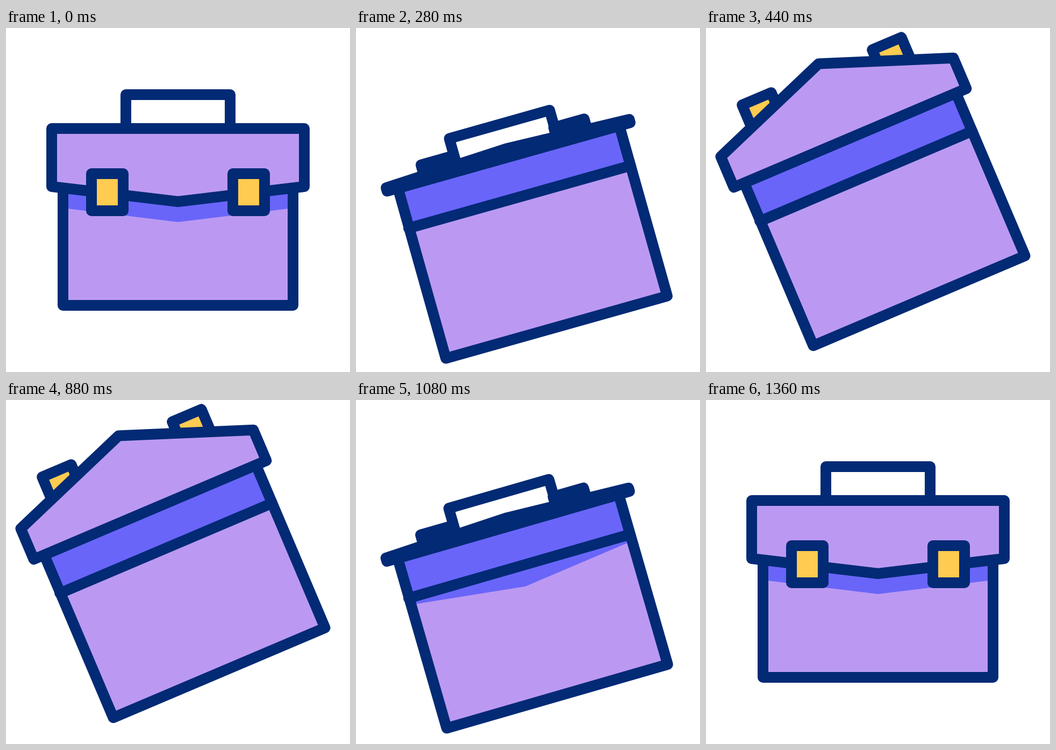
An HTML page with a canvas for the animation above (1480 ms loop, 640 px wide and 640 px high).

```html
<!DOCTYPE html>
<html lang="en">
<head>
<meta charset="utf-8">
<title>Briefcase</title>
<style>
html, body { margin: 0; width: 100%; height: 100%; overflow: hidden; background: #fff; }
canvas { display: block; width: 640px; height: 640px; }
</style>
</head>
<body>
<canvas id="stage" width="640" height="640"></canvas>
<script>
const ctx = document.getElementById('stage').getContext('2d');
const NAVY = '#032a75', LILAC = '#bb99f2', VIOLET = '#6965f9', GOLD = '#ffcb50';
const LOOP = 1480, STEP = 40;
const HINGE = 187, RIM = 264, BASE = 516;

const lerp = (a, b, k) => a + (b - a) * k;

function ease(t, from, to) {
  const p = Math.min(1, Math.max(0, (t - from) / (to - from)));
  return p * p * (3 - 2 * p);
}

// Value through [time, value] keys, eased between neighbours.
function track(t, keys) {
  let v = keys[0][1];
  for (let i = 1; i < keys.length; i++) {
    if (t > keys[i - 1][0]) v = lerp(keys[i - 1][1], keys[i][1], ease(t, keys[i - 1][0], keys[i][0]));
  }
  return v;
}

function shape(points, fill, line = true, closed = true) {
  ctx.beginPath();
  points.forEach(([x, y]) => ctx.lineTo(x, y));
  if (closed) ctx.closePath();
  if (fill) {
    ctx.fillStyle = fill;
    ctx.fill();
  }
  if (line) ctx.stroke();
}

const box = (x1, y1, x2, y2) => [[x1, y1], [x2, y1], [x2, y2], [x1, y2]];

// Flap hanging from the hinge; negative depths stand up.
function flap(side, tip) {
  shape([[85, HINGE], [555, HINGE], [555, HINGE + side], [320, HINGE + tip], [85, HINGE + side]], LILAC);
}

function clasps(near, far, shift = 0) {
  for (const x of [159, 422 + shift]) shape(box(x, HINGE + near, x + 59, HINGE + far), GOLD);
}

function body(shade) {
  const case_ = box(106, HINGE, 534, BASE);
  shape(case_, VIOLET, false);
  ctx.save();
  ctx.beginPath();
  ctx.rect(106, RIM, 428, BASE - RIM);
  ctx.clip();
  shape([[106, 335 + shade], [320, 361 + shade], [534, 335 + shade], [534, BASE], [106, BASE]], LILAC, false);
  ctx.restore();
  shape([[105, RIM], [534, RIM]], null, true, false);
  shape(case_);
}

function draw(t) {
  const angle = track(t, [[80, 0], [400, 23], [920, 23], [1360, 0]]);
  const drop = track(t, [[80, 0], [240, 55.5], [400, 7], [920, 7], [1160, 55.5], [1360, 0]]);
  const shade = track(t, [[80, 0], [280, -102], [880, -102], [1320, 0]]);
  const hang = track(t, [[80, 1], [280, 0], [1080, 0], [1320, 1]]);
  const rise = track(t, [[280, 0], [440, 1], [880, 1], [1080, 0]]);
  const open = t >= 280 && t <= 1080;

  ctx.setTransform(1, 0, 0, 1, 0, 0);
  ctx.fillStyle = '#fff';
  ctx.fillRect(0, 0, 640, 640);
  ctx.translate(320, 320 + drop);
  ctx.rotate(-angle * Math.PI / 180);
  ctx.translate(-320, -320);
  ctx.strokeStyle = NAVY;
  ctx.lineWidth = 20;
  ctx.lineJoin = ctx.lineCap = 'round';

  shape(box(223, 124, 417, HINGE));
  body(shade);
  if (open) {
    const far = lerp(-30, -135, rise);
    clasps(far * 0.55, far, lerp(-6.5, 0, rise));
    flap(lerp(-6.5, -62, rise), lerp(-16, -150, rise));
  } else {
    flap(108 * hang, 136 * hang);
    clasps(84 * hang, 153 * hang);
  }
}

const start = performance.now();
function tick() {
  const t = (performance.now() - start) % LOOP;
  draw(Math.floor(t / STEP) * STEP);
  requestAnimationFrame(tick);
}
draw(0);
requestAnimationFrame(tick);
</script>
</body>
</html>
```
